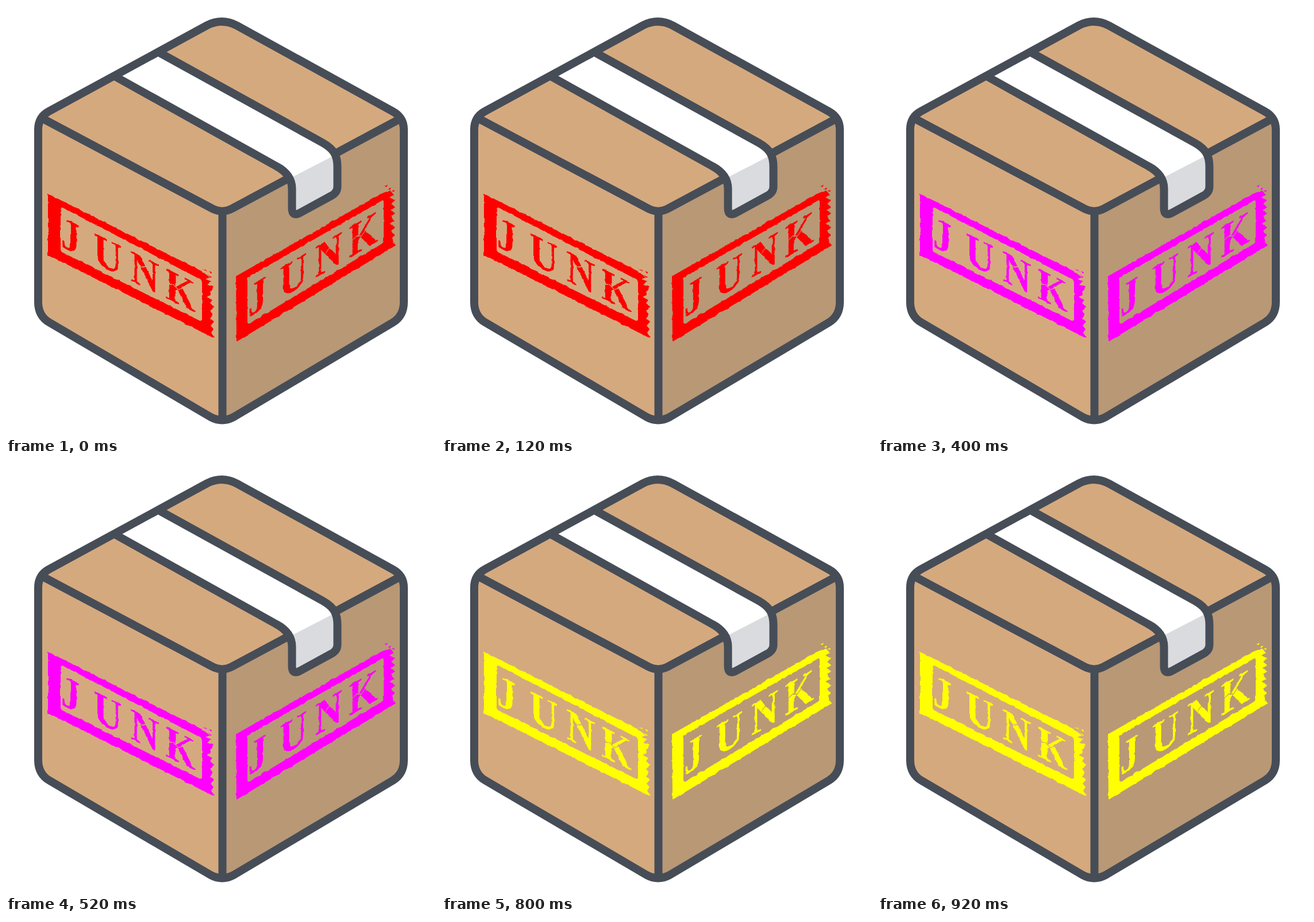
Animation of 748x748 px, one loop 1 s. Source, as an HTML page:

```html
<!DOCTYPE html>
<html lang="en">
<head>
<meta charset="utf-8">
<title>Junk box</title>
<style>
  html, body { margin: 0; width: 100%; height: 100%; overflow: hidden; background: #fff; }
  svg { display: block; width: 100%; height: 100%; }
  .card { fill: #d5a97e; }
  .shade { fill: #b99876; }
  .lines { fill: none; stroke: #464d57; stroke-width: 14; stroke-linejoin: round; }
  .stamp { filter: url(#rough); animation: ink 1s step-end infinite; }
  .left { --face: #d5a97e; }
  .right { --face: #b99876; }
  .frame { fill-rule: evenodd; }
  .crack { fill: none; stroke: var(--face); stroke-width: 1.4; }
  text { font: bold 79px "Liberation Serif", "Times New Roman", serif; }

  @keyframes ink {
    0%   { fill: #f00; }
    20%  { fill: #0ff; }
    40%  { fill: #f0f; }
    60%  { fill: #0f0; }
    80%  { fill: #ff0; }
    100% { fill: #f00; }
  }
</style>
</head>
<body>
<svg viewBox="0 0 748 748">
  <defs>
    <filter id="rough" filterUnits="userSpaceOnUse" x="0" y="0" width="748" height="748" color-interpolation-filters="sRGB">
      <feTurbulence type="fractalNoise" baseFrequency=".1" numOctaves="2" seed="4"/>
      <feDisplacementMap in="SourceGraphic" scale="3.5" xChannelSelector="R" yChannelSelector="G"/>
    </filter>
    <path id="hull" d="M56 215Q56 193 75 183L350 33.5Q376 20.5 402 34.2L673 183.5Q692 194 692 215V515Q692 539 673 550.5L396 715Q376 725.7 356 715L75 550.3Q56 539 56 515Z"/>
    <path id="tape" d="M187 121L470 278.5C488 288 497.5 301 497.5 318V352Q497.5 367 511 360L567 329.5Q576.5 324 576.5 314V280C576.5 259 570 249 551 238L263 79"/>
    <g id="word">
      <text x="25 91 165 235" y="80">JUNK</text>
      <path class="crack" d="M240 54l12-4 10 5 9-8M187 48l9-6 12 3"/>
    </g>
  </defs>

  <use href="#hull" class="card"/>
  <path class="shade" d="M376.5 357L392 353 684 197 692 215V515Q692 539 673 550.5L396 715 376.5 720Z"/>
  <use href="#tape" fill="#fff"/>
  <path fill="#d9dbde" d="M497.5 298L570 260.5 576.5 280V314Q576.5 324 567 329.5L511 360Q497.5 367 497.5 352Z"/>

  <g class="lines">
    <path d="M66 197L360 353Q376 361 392 353L491 300M576 255L684 197M376.5 357V720"/>
    <use href="#tape"/>
    <use href="#hull"/>
  </g>

  <g class="stamp left">
    <path class="frame" d="M73 326.5L340 461 355 472 347 475 357 479 350 485 361 488 355 496 357 503 349 506 358 511 354 517 363 524 354 530 360 536 355 543 362 549 356 556 361 562 357 568 362 578 73 433Z
      M99 351Q95 349 95 355V423Q95 427 99 429L336 547Q341 549 341 544V482Q341 477 337 475Z"/>
    <path d="M342 457l6 2 2 3zM353 461l5 2-1 3zM351 467l7 4-2 2z"/>
    <use href="#word" transform="matrix(.866 .428 0 1 73.5 327)"/>
  </g>

  <g class="stamp right">
    <path class="frame" d="M400 470L652 327 668 321 675 328 667 333 677 338 669 343 677 350 670 355 677 361 669 366 676 373 667 378 676 385 670 391 676 398 671 404 677 417 401 584Z
      M424 470Q420 472 420 476V549Q420 554 424 552L653 414Q657 412 657 407V342Q657 336 653 339Z"/>
    <path d="M658 313l6-3-2 4zM664 318l6-2-2 4zM670 322l5-2 1 3z"/>
    <use href="#word" transform="matrix(.834 -.49 0 1.03 400 472)"/>
  </g>
</svg>
</body>
</html>
```
